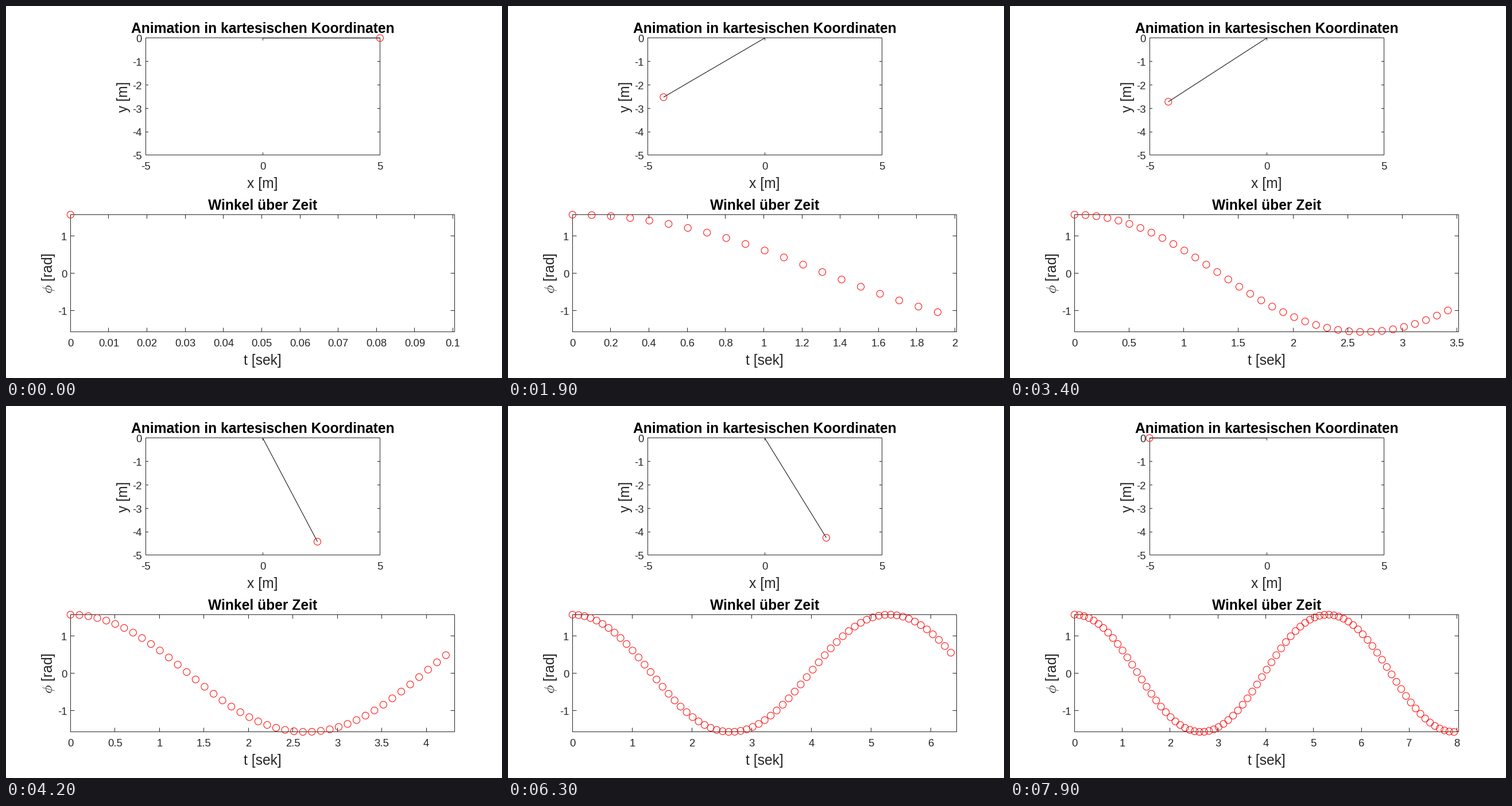
Animation of 864x648 px, one loop 8 s. Source, as a matplotlib script:

```python
import math

import matplotlib.pyplot as plt
import numpy as np
from matplotlib.animation import FuncAnimation
from matplotlib.collections import LineCollection

W, H, DPI = 864, 648, 72          # one point equals one pixel
FRAMES, INTERVAL = 80, 100
DT = 20 / 199                     # simulated seconds per frame
G, LENGTH = 9.81, 5.0
GREY = (0.15, 0.15, 0.15)
TICK_SIZE, LABEL_SIZE = 18.5, 24.65

# Plot boxes in pixels: left, top, right, bottom
PATH_BOX = (243.0, 55.8, 651.4, 259.9)
TIME_BOX = (112.35, 363.5, 781.92, 567.7)

plt.rcParams["font.family"] = "Liberation Sans"
plt.rcParams["mathtext.fontset"] = "cm"


def swing(count, substeps=20):
    """Pendulum angle at each frame, released at rest from pi/2 (RK4)."""
    def deriv(s):
        return np.array([s[1], -G / LENGTH * math.sin(s[0])])

    h = DT / substeps
    state = np.array([math.pi / 2, 0.0])
    angles = [state[0]]
    for _ in range(count - 1):
        for _ in range(substeps):
            k1 = deriv(state)
            k2 = deriv(state + h / 2 * k1)
            k3 = deriv(state + h / 2 * k2)
            k4 = deriv(state + h * k3)
            state = state + h / 6 * (k1 + 2 * k2 + 2 * k3 + k4)
        angles.append(state[0])
    return np.array(angles)


def scaler(lo, hi, start, end):
    """Linear map from data range to pixel range."""
    return lambda v: start + (np.asarray(v) - lo) / (hi - lo) * (end - start)


def crisp(v):
    """Centre of the pixel that holds v."""
    return math.floor(v + 1e-6) + 0.5


def tick_step(limit):
    """Smallest 1-2-5 step that gives at most ten intervals."""
    for power in range(-3, 2):
        for base in (1, 2, 5):
            step = base * 10.0 ** power
            if math.floor(limit / step + 1e-9) <= 10:
                return step
    return 100.0


fig = plt.figure(figsize=(W / DPI, H / DPI), dpi=DPI, facecolor="white")
ax = fig.add_axes([0, 0, 1, 1])
ax.set_xlim(0, W)
ax.set_ylim(H, 0)
ax.axis("off")


def text(x, y, s, size=LABEL_SIZE, color=GREY, ha="center", **kw):
    return ax.text(x, y, s, fontsize=size, color=color, ha=ha,
                   va="baseline", rotation_mode="anchor", **kw)


def segments(parts):
    return ax.add_collection(LineCollection(
        parts, colors=[GREY], linewidths=1, snap=False, zorder=1))


def x_ticks(box, xs, size):
    _, top, _, bottom = map(crisp, box)
    return [seg for x in map(crisp, xs) for seg in
            ([(x, top), (x, top + size)], [(x, bottom), (x, bottom - size)])]


def y_ticks(box, ys, size):
    left, _, right, _ = map(crisp, box)
    return [seg for y in map(crisp, ys) for seg in
            ([(left, y), (left + size, y)], [(right, y), (right - size, y)])]


def frame(box, title, xlabel, ylabel, ylabel_x):
    left, top, right, bottom = map(crisp, box)
    ax.plot([left, right, right, left, left], [top, top, bottom, bottom, top],
            color=GREY, lw=1, snap=False, zorder=1, solid_joinstyle="miter")
    left, top, right, bottom = box
    mid = (left + right) / 2
    text(mid, top - 8.4, title, color="black", weight="bold")
    text(mid, bottom + 57, xlabel)
    text(ylabel_x, (top + bottom) / 2, ylabel, rotation=90)


def y_labels(box, values, scale):
    for v in values:
        text(box[0] - 6.2, scale(v) + 7.3, f"{v:d}", TICK_SIZE, ha="right")


def rings():
    return ax.scatter([], [], s=144, marker="o", linewidths=1,
                      edgecolors="red", facecolors="none",
                      clip_on=False, zorder=3)


frame(PATH_BOX, "Animation in kartesischen Koordinaten", "x [m]", "y [m]", 212)
frame(TIME_BOX, "Winkel über Zeit", "t [sek]", r"$\phi$ [rad]", 81)

# Upper plot: path of the bob
to_x = scaler(-5, 5, PATH_BOX[0], PATH_BOX[2])
to_y = scaler(0, -5, PATH_BOX[1], PATH_BOX[3])
segments(x_ticks(PATH_BOX, [to_x(0)], 4.5)
         + y_ticks(PATH_BOX, to_y(range(-4, 0)), 4.5))
y_labels(PATH_BOX, range(-5, 1), to_y)
for v in (-5, 0, 5):
    text(to_x(v), PATH_BOX[3] + 25.5, f"{v:d}", TICK_SIZE)

# Lower plot: angle over time
to_phi = scaler(math.pi / 2, -math.pi / 2, TIME_BOX[1], TIME_BOX[3])
segments(y_ticks(TIME_BOX, to_phi([-1, 0, 1]), 7))
y_labels(TIME_BOX, (-1, 0, 1), to_phi)
time_ticks = segments([])
time_labels = [text(0, TIME_BOX[3] + 25.5, "", TICK_SIZE) for _ in range(11)]

rod, = ax.plot([], [], color="black", lw=1, snap=False, zorder=2,
               solid_capstyle="butt")
bob = rings()
trace = rings()

phi = swing(FRAMES)
times = DT * np.arange(FRAMES)


def draw(i):
    x = to_x(LENGTH * math.sin(phi[i]))
    y = to_y(-LENGTH * math.cos(phi[i]))
    rod.set_data([to_x(0), x], [to_y(0), y])
    bob.set_offsets([(x, y)])

    limit = DT * (i + 1)
    to_t = scaler(0, limit, TIME_BOX[0], TIME_BOX[2])
    trace.set_offsets(np.column_stack(
        [to_t(times[:i + 1]), to_phi(phi[:i + 1])]))

    step = tick_step(limit)
    values = [k * step for k in range(math.floor(limit / step + 1e-9) + 1)]
    time_ticks.set_segments(x_ticks(TIME_BOX, to_t(values), 7))
    for k, label in enumerate(time_labels):
        shown = k < len(values)
        label.set_text(f"{values[k]:g}" if shown else "")
        if shown:
            label.set_x(float(to_t(values[k])))
    return rod, bob, trace, time_ticks, *time_labels


anim = FuncAnimation(fig, draw, frames=FRAMES, interval=INTERVAL,
                     repeat=True, repeat_delay=0, blit=False)
plt.show()
```
